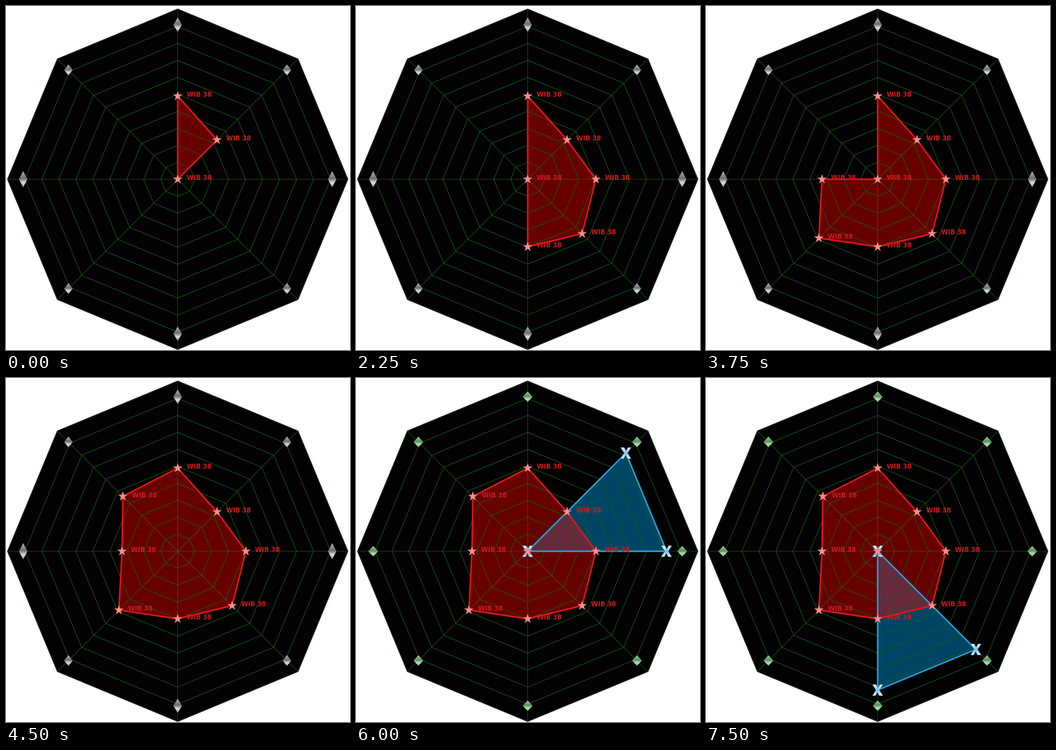
These frames come from a looping animation (550x550 px, 8000 ms). An HTML page:

```html
<!DOCTYPE html>
<html lang="en">
<head>
<meta charset="utf-8">
<title>Radar chart</title>
<style>
  html, body { margin: 0; width: 100%; height: 100%; overflow: hidden; background: #fff; }
  svg { display: block; width: 100vw; height: 100vh; }
  text { font: bold 10px "DejaVu Sans", sans-serif; fill: #cf181c; }
  .grid { fill: none; stroke: #125c13; stroke-width: 1.2; stroke-opacity: .78; }
  .axis { stroke: #2a7a2a; stroke-width: 1.1; stroke-dasharray: 1 1; }
  .edge { fill: none; stroke: #1c5c1c; stroke-dasharray: 1 1; }
  .outline { fill: none; stroke-width: 2.4; stroke-linejoin: round; }
</style>
</head>
<body>
<svg viewBox="0 0 550 550" xmlns="http://www.w3.org/2000/svg">
  <defs>
    <linearGradient id="starFill" x1="0" y1="0" x2="0" y2="1">
      <stop offset="0" stop-color="#ffc4c0"/>
      <stop offset=".5" stop-color="#f58a88"/>
      <stop offset="1" stop-color="#ffb0ac"/>
    </linearGradient>
    <linearGradient id="crossFill" x1="0" y1="0" x2="0" y2="1">
      <stop offset="0" stop-color="#f2faff"/>
      <stop offset=".5" stop-color="#79bfe8"/>
      <stop offset="1" stop-color="#e6f5ff"/>
    </linearGradient>
    <linearGradient id="silver" x1="0" y1="0" x2="0" y2="1">
      <stop offset="0" stop-color="#b4b4b6"/>
      <stop offset=".45" stop-color="#6c6c70"/>
      <stop offset=".72" stop-color="#dededf"/>
      <stop offset="1" stop-color="#8a8a8c"/>
    </linearGradient>
    <linearGradient id="green" x1="0" y1="0" x2="0" y2="1">
      <stop offset="0" stop-color="#9ccb9c"/>
      <stop offset=".45" stop-color="#569457"/>
      <stop offset=".72" stop-color="#b9dcb8"/>
      <stop offset="1" stop-color="#6aa66a"/>
    </linearGradient>
    <path id="cross" fill="url(#crossFill)" stroke="#17506f" stroke-width=".5"
      d="M-8.5-9H-2.5L.3-3.6 3.4-9H8.5L3 0 8.5 9H2.5L-.3 3.6-3.4 9H-8.5L-3 0Z"/>
  </defs>
  <g id="scene"></g>
</svg>
<script>
const CX = 274.5, CY = 277, RADIUS = 271.5, STEP = 750, LOOP = 8000;
const LABEL = 'WIB 38';
const RED_RADII = [133, 89, 109, 123, 108, 133, 89, 124];
const BLUE_RADIUS = 222, FIRST_BLUE = 7;

const polar = (i, r) => [
  CX + r * Math.sin(i * Math.PI / 4),
  CY - r * Math.cos(i * Math.PI / 4)
];
const center = [CX, CY];
const points = list => list.map(p => p.map(v => v.toFixed(1)).join()).join(' ');
const polygon = (list, attrs) => `<polygon points="${points(list)}" ${attrs}/>`;
const octagon = r => Array.from({ length: 8 }, (_, i) => polar(i, r));

const starShape = Array.from({ length: 10 }, (_, i) => {
  const a = i * Math.PI / 5, r = i % 2 ? 3.1 : 8;
  return [r * Math.sin(a), -r * Math.cos(a)];
});
const star = ([x, y]) => `<g transform="translate(${x} ${y})">` +
  polygon(starShape, 'fill="url(#starFill)" stroke="#b5302f" stroke-width=".5"') + '</g>';
const cross = ([x, y]) => `<use href="#cross" x="${x}" y="${y}"/>`;
const label = ([x, y]) => `<text x="${x + 14.5}" y="${y + 1.3}">${LABEL}</text>`;
const diamond = ([x, y], w, h, fill) =>
  polygon([[x, y - h], [x + w, y], [x, y + h], [x - w, y]], `fill="url(#${fill})"`);

function diamonds(blueStage) {
  return octagon(247).map((p, i) => {
    const silverHeight = i % 2 ? 8.8 : i % 4 ? 13 : 11.5;
    return blueStage ? diamond(p, 7.8, 8.5, 'green') : diamond(p, 6.8, silverHeight, 'silver');
  }).join('');
}

function gridLines() {
  let out = polygon(octagon(RADIUS), 'class="edge"');
  for (let i = 1; i < 10; i++) out += polygon(octagon(RADIUS * i / 10), 'class="grid"');
  for (let i = 0; i < 4; i++) {
    out += `<polyline class="axis" points="${points([polar(i, RADIUS), polar(i + 4, RADIUS)])}"/>`;
  }
  return out;
}
const backdrop = polygon(octagon(RADIUS + 1.2), 'fill="#020202"');
const grid = gridLines();

function render(step) {
  const blueStage = step >= FIRST_BLUE;
  const tips = RED_RADII.slice(0, step + 2).map((r, i) => polar(i, r));
  const closed = tips.length === 8;
  const red = closed ? tips : [...tips, center];
  const stars = blueStage ? [...tips, center] : red;
  const first = step - FIRST_BLUE;
  const blue = blueStage
    ? [center, polar(first, BLUE_RADIUS), polar(first + 1, BLUE_RADIUS)] : [];

  return backdrop +
    polygon(blue, 'fill="#004664"') +
    polygon(red, 'fill="#f00" fill-opacity=".4"') +
    grid +
    polygon(blue, 'class="outline" stroke="#25a0dc"') +
    polygon(red, 'class="outline" stroke="#e3141a"') +
    diamonds(blueStage) +
    blue.map(cross).join('') +
    red.map(label).join('') +
    stars.map(star).join('');
}

const scene = document.getElementById('scene');
let shown = -1;
function tick() {
  const step = Math.floor(performance.now() % LOOP / STEP);
  if (step !== shown) {
    scene.innerHTML = render(step);
    shown = step;
  }
  requestAnimationFrame(tick);
}
tick();
</script>
</body>
</html>
```
